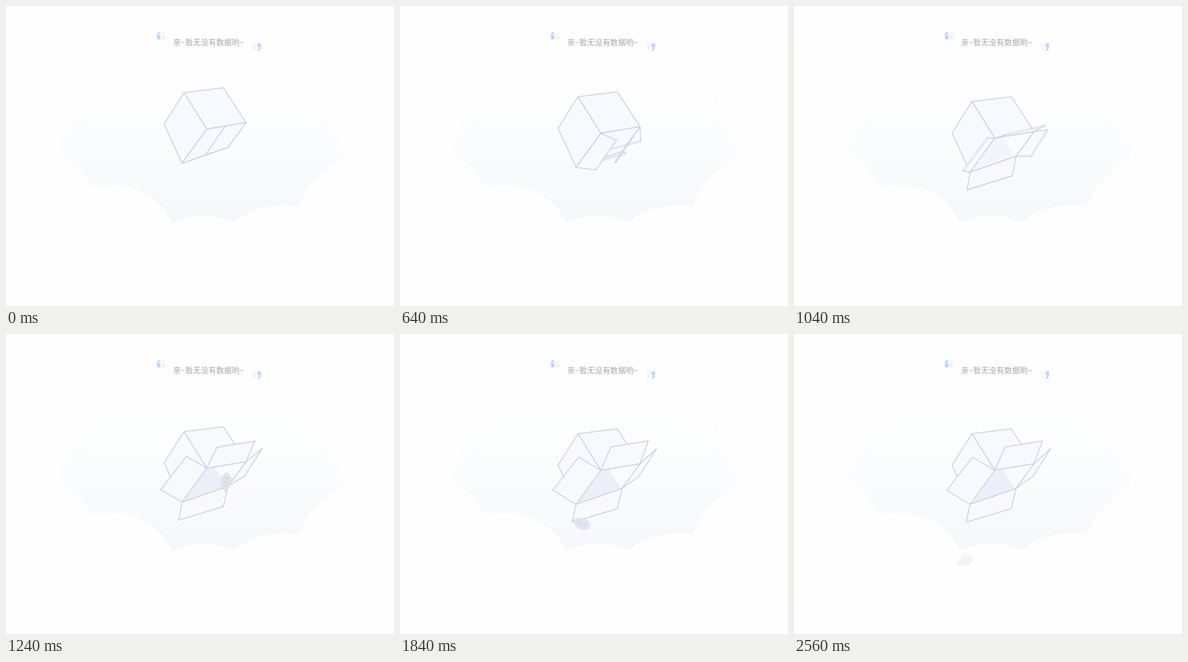
Recreate the animation shown at these times as an HTML page with a canvas. Size 800 by 620 pixels, loop 4 s.

```html
<!DOCTYPE html>
<html lang="zh">
<head>
<meta charset="utf-8">
<style>
  html, body { margin: 0; width: 100%; height: 100%; overflow: hidden; background: #fefefe; }
  canvas { display: block; }
</style>
</head>
<body>
<canvas id="stage" width="800" height="620"></canvas>
<script>
const ctx = document.getElementById('stage').getContext('2d');
const LOOP = 4000, STEP = 40;
const LINE = '#cbd4e1', FACE = '#f8f9fe';

// Box corners before the box sinks
const A = [367, 179], B = [448, 169], C = [495, 241], D = [414, 254.5];
const E = [326, 244], F = [363, 325], G = [458, 292];

// Each key: time, then the offset of the free edge from both hinge ends
const flaps = [
  { hinge: [D, C], keys: [
    [160, -25, 35, -19, 26], [480, -20, 38, -18, 30], [800, 18, 38, 21, 30],
    [1040, 22, -7, 22, -12], [1240, 21, -43, 18, -42], [1640, 21, -48, 17, -47]] },
  { hinge: [F, G], keys: [
    [160, 25, -35, 18, -25], [480, 24, -33, 17, -23], [800, -1, 29.5, -3, 33],
    [1040, -6, 36.5, -8, 40.5], [1240, -7, 37, -10, 42], [1640, -8, 37, -10, 42]] },
  { hinge: [C, G], keys: [
    [160, -43, 7, -47, 16], [480, -39, 9, -43, 17], [800, 15, 26, 18, 27],
    [1040, 28, -3.5, 31, 0], [1240, 33, -27, 34, -21], [1640, 34, -31, 35, -25]] },
  { hinge: [D, F], keys: [
    [160, 38, -6.5, 48, -17], [480, 37, -3, 47, -14], [800, 22, 28, 28, 20],
    [1040, -15, 0, -14, -3], [1240, -42, -24, -44, -26], [1640, -46, -27, -48, -29]] }
];

// time, x, y, turn in degrees, opacity
const leafKeys = [
  [1080, 446, 288, -4, 0], [1240, 454, 306.5, 5, 1], [1480, 440, 348, 40, 1],
  [1640, 408, 380, 80, 1], [1840, 374, 391.5, 110, .9], [2100, 431, 357, 20, .85],
  [2360, 392, 438, 62, .7], [2560, 352.5, 468, 68, .36]
];

const clamp = v => Math.min(1, Math.max(0, v));

function slope(keys, i, c) {
  if (i === 0 || i === keys.length - 1) return 0;
  const [p, k, n] = [keys[i - 1], keys[i], keys[i + 1]];
  if ((k[c] - p[c]) * (n[c] - k[c]) <= 0) return 0;
  return (n[c] - p[c]) / (n[0] - p[0]);
}

// Smooth curve through the keys, flat at turning points
function track(keys, t) {
  const last = keys[keys.length - 1];
  if (t <= keys[0][0]) return keys[0].slice(1);
  if (t >= last[0]) return last.slice(1);
  const i = keys.findIndex(k => k[0] > t) - 1;
  const a = keys[i], b = keys[i + 1], span = b[0] - a[0];
  const u = (t - a[0]) / span, v = 1 - u;
  return a.slice(1).map((_, n) => {
    const c = n + 1;
    return a[c] * (1 + 2 * u) * v * v + b[c] * u * u * (3 - 2 * u) +
      span * u * v * (slope(keys, i, c) * v - slope(keys, i + 1, c) * u);
  });
}

function trace(points, close) {
  ctx.beginPath();
  points.forEach(p => ctx.lineTo(p[0], p[1]));
  if (close) ctx.closePath();
}

function face(points, fill) {
  trace(points, true);
  ctx.fillStyle = fill;
  ctx.fill();
  ctx.stroke();
}

function cloud() {
  ctx.save();
  ctx.beginPath();
  ctx.moveTo(107, 150);
  ctx.lineTo(107, 302);
  ctx.quadraticCurveTo(152, 326, 176, 374);
  ctx.bezierCurveTo(240, 358, 310, 380, 343, 448);
  ctx.quadraticCurveTo(408, 418, 471, 448);
  ctx.bezierCurveTo(500, 420, 550, 406, 602, 414);
  ctx.quadraticCurveTo(633, 345, 696, 314);
  ctx.lineTo(696, 150);
  ctx.clip();
  const g = ctx.createLinearGradient(0, 150, 0, 448);
  g.addColorStop(0, '#fefefe');
  g.addColorStop(.4, '#fbfcfd');
  g.addColorStop(1, '#f6f7fb');
  ctx.fillStyle = g;
  ctx.filter = 'blur(9px)';
  ctx.beginPath();
  ctx.moveTo(180, 150);
  ctx.quadraticCurveTo(126, 230, 112, 310);
  ctx.lineTo(112, 480);
  ctx.lineTo(690, 480);
  ctx.lineTo(690, 310);
  ctx.quadraticCurveTo(676, 230, 622, 150);
  ctx.fill();
  ctx.restore();
}

function mark(x, y, color, turned) {
  ctx.save();
  ctx.translate(x, y);
  if (turned) ctx.rotate(Math.PI);
  ctx.fillStyle = color;
  ctx.fill(new Path2D('M-3.7 8V0Q-3.5-7 3.5-8V-6Q0-4 0 0H3.5V8Z'));
  ctx.restore();
}

function caption() {
  mark(315, 61, '#bcd6fd');
  mark(325.3, 61, '#f2f3f4');
  mark(511.7, 85, '#f2f3f4', true);
  mark(522, 85, '#bcd6fd', true);
  ctx.font = '500 16px "Noto Sans CJK SC", "Noto Sans CJK", sans-serif';
  ctx.fillStyle = '#a8a8a8';
  ctx.fillText('亲~暂无没有数据哟~', 344.5, 81);
}

function flap({ hinge: [p, q], keys }, t) {
  const o = track(keys, t), before = track(keys, t - STEP);
  const a = [p[0] + o[0], p[1] + o[1]], b = [q[0] + o[2], q[1] + o[3]];
  trace([p, a, b, q], true);
  ctx.fillStyle = FACE;
  ctx.fill();
  trace([a, p, q, b]);
  ctx.stroke();
  // A fast free edge looks wider and paler
  const speed = Math.hypot(o[0] - before[0], o[1] - before[1]);
  ctx.save();
  ctx.lineWidth = 2 + Math.min(3, speed * .4);
  ctx.globalAlpha = Math.min(1, 2.2 / ctx.lineWidth);
  trace([a, b]);
  ctx.stroke();
  ctx.restore();
}

function box(t) {
  const sink = t < 160 ? 0 : 27 * (1 - Math.cos(Math.PI * clamp(t / 1680))) / 2;
  ctx.save();
  ctx.translate(0, sink);
  ctx.strokeStyle = LINE;
  ctx.lineWidth = 2;
  ctx.lineJoin = ctx.lineCap = 'round';
  face([A, B, C, D], FACE);
  face([A, D, F, E], FACE);
  face([D, C, G, F], '#fafbfe');
  ctx.globalAlpha = clamp((t - 860) / 380);
  trace([D, [430, 252], [456, 292], F], true);
  ctx.fillStyle = '#eceef8';
  ctx.fill();
  ctx.globalAlpha = 1;
  flaps.forEach(f => flap(f, t));
  ctx.restore();
}

function leaf(t) {
  if (t <= leafKeys[0][0]) return;
  const [x, y, turn, alpha] = track(leafKeys, t);
  ctx.save();
  ctx.translate(x, y);
  ctx.rotate(turn * Math.PI / 180);
  ctx.globalAlpha = alpha;
  ctx.lineWidth = 1;
  ctx.lineCap = 'round';
  ctx.strokeStyle = '#d5dbe6';
  ctx.fillStyle = '#e3e7f1';
  const body = new Path2D('M0-19.5C8-15 12-8 11.5 0C11 9 4 13 0 20C-5 13-11 9-11.5 0C-12-8-8-15 0-19.5Z');
  ctx.fill(body);
  ctx.stroke(body);
  ctx.strokeStyle = '#cbd3df';
  ctx.stroke(new Path2D('M0 19V-15M0 10L-6 3M0 10L6 3M0 2L-7-5M0 2L7-5M0-6L-5-11M0-6L5-11'));
  ctx.restore();
}

function draw(now) {
  const t = Math.floor((now % LOOP) / STEP) * STEP;
  ctx.fillStyle = '#fefefe';
  ctx.fillRect(0, 0, 800, 620);
  cloud();
  caption();
  box(t);
  leaf(t);
}

let start;
function tick(now) {
  start ??= now;
  draw(now - start);
  requestAnimationFrame(tick);
}
draw(0);
requestAnimationFrame(tick);
</script>
</body>
</html>
```
